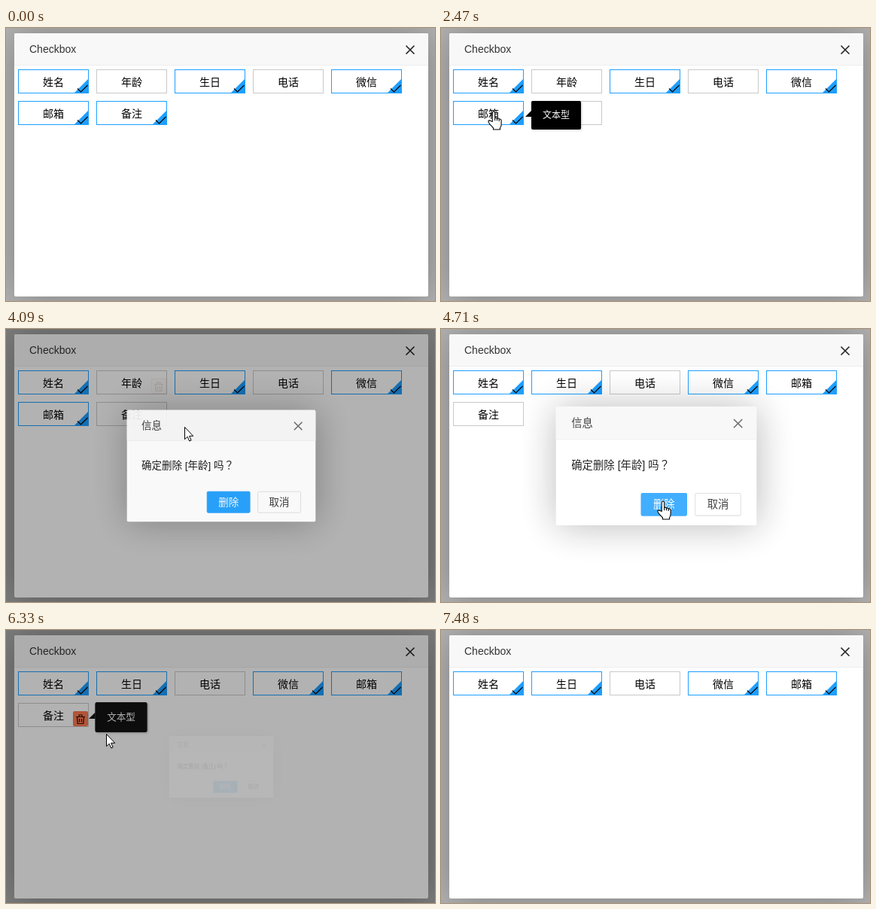
These frames come from a looping animation (570x363 px, 8340 ms). An HTML page:

```html
<!DOCTYPE html>
<html lang="zh-CN">
<head>
<meta charset="utf-8">
<title>Checkbox</title>
<style>
html, body { margin: 0; width: 100%; height: 100%; overflow: hidden; background: #b3b3b3; }
body { font: 14px "Liberation Sans", "Noto Sans CJK SC", "Noto Sans CJK", sans-serif; }
#stage { position: relative; width: 570px; height: 363px; overflow: hidden; background: #b3b3b3; }
#stage * { box-sizing: border-box; }
#stage div, #stage span, svg { position: absolute; white-space: nowrap; }
svg { overflow: visible; fill: none; }
.layer { background: #fff; border-radius: 2px; box-shadow: 1px 1px 50px rgba(0,0,0,.3); }
.title { left: 0; right: 0; top: 0; height: 43px; padding-left: 20px; line-height: 42px; color: #333;
  background: #f8f8f8; border-bottom: 1px solid #eee; border-radius: 2px 2px 0 0; }
.close { right: 18px; top: 16px; width: 12px; height: 12px; stroke: #222; stroke-width: 1.6; }
#main { left: 11px; top: 7px; width: 550px; height: 350px; }
.item { width: 94px; height: 32px; border: 1px solid #c9c9c9; line-height: 32px; text-align: center; color: #000; background: #fff; }
.on { inset: -1px; border: 1px solid #1e9fff; }
.on svg { right: 0; bottom: 0; width: 19px; height: 19px; }
.bin { left: 72px; top: 10px; width: 20px; height: 20px; }
.bin i { position: absolute; inset: 0; background: #ff5722; border-radius: 2px; }
.bin svg { left: 0; top: 0; width: 20px; height: 20px; stroke: #2a1008; stroke-width: 1.2; }
.tip { width: 66px; height: 38px; background: #000; color: #fff; border-radius: 2px; font-size: 12px;
  line-height: 38px; text-align: center; box-shadow: 1px 1px 3px rgba(0,0,0,.2); }
.tip::before { content: ""; position: absolute; left: -8px; top: 13px; border-left: 8px solid transparent; border-bottom: 8px solid #000; }
#shade { inset: 0; background: rgba(0,0,0,.3); }
#dialog { left: 156px; top: 105px; width: 260px; height: 154px; }
#dialog .close { stroke: #666; }
#question { left: 20px; top: 63px; line-height: 24px; color: #111; }
#question b { font: inherit; font-family: "Noto Sans CJK JP", sans-serif; }
.button { top: 112px; width: 60px; height: 30px; line-height: 29px; text-align: center; border: 1px solid #dedede; border-radius: 2px; color: #333; }
#ok { left: 110px; background: #1e9fff; border-color: #1e9fff; color: #fff; }
#cancel { left: 180px; }
#cursor { left: 0; top: 0; width: 20px; height: 26px; fill: #fff; stroke: #000; stroke-linejoin: round; }
</style>
</head>
<body>
<div id="stage">
  <div id="main" class="layer">
    <div class="title">Checkbox</div>
    <svg class="close"><path d="M.5 .5l11 11m0-11l-11 11"/></svg>
  </div>
  <div id="items"></div>
  <div id="tips"></div>
  <div id="shade"></div>
  <div id="dialog" class="layer">
    <div class="title">信息</div>
    <svg class="close"><path d="M.5 .5l11 11m0-11l-11 11"/></svg>
    <div id="question">确定删除 [<span id="name" style="position: static"></span>] 吗<b lang="ja">？</b></div>
    <div id="ok" class="button">删除</div>
    <div id="cancel" class="button">取消</div>
  </div>
  <svg id="cursor">
    <path id="arrow" d="M.5 .5v16.2l3.7-3.5 2.5 5.8 2.4-1-2.5-5.7h5.1z"/>
    <g id="hand" transform="translate(-7.7 -.6) scale(1.08)">
      <path d="M5.5 13V2.2a1.6 1.6 0 0 1 3.2 0V8.5q1.6-1 2.6.6 1.7-.7 2.5.8 2.2-.4 2.7 1.6v5q0 2.5-1.5 4.2v2H6.7v-1.8L2.3 16.2Q.2 13.2.6 12.4q1-1.6 2.8-.3z"/>
      <path d="M8.7 8.5V12M11.3 9v3M13.8 9.9v2.6"/>
    </g>
  </svg>
</div>
<script>
const LOOP = 8340, TICK = 77.24, APPEAR = 215, OPENING = 300, CLOSING = 200;
const $ = id => document.getElementById(id);

const items = [
  { name: '姓名', on: true }, { name: '年龄', type: '数值型' }, { name: '生日', type: '日期型', on: true },
  { name: '电话' }, { name: '微信', on: true }, { name: '邮箱', on: true }, { name: '备注', on: true, off: 1030 }
];
const dialogs = [{ item: items[1], open: 3880, close: 4682 }, { item: items[6], open: 6298, close: 6920 }];

// Pointer moves; everything it hovers follows from these.
const origin = { x: 317, y: 307 };
const moves = [
  { at: APPEAR, lasts: 600, x: 186, y: 115 },
  { at: 1610, lasts: 550, x: 69.5, y: 110.5 },
  { at: 2470, lasts: 500, x: 180, y: 74 },
  { at: 3250, lasts: 400, x: 204.5, y: 73 },
  { at: 3900, lasts: 500, x: 295, y: 229 },
  { at: 4700, lasts: 350, x: 190, y: 72 },
  { at: 5080, lasts: 250, x: 98, y: 105 },
  { at: 5750, lasts: 30, x: 94, y: 117.5 },
  { at: 6255, lasts: 335, x: 289, y: 220 },
  { at: 6700, lasts: 300, x: 299, y: 240 },
  { at: 7100, lasts: 370, x: 535, y: 376 }
];

const clamp = v => Math.max(0, Math.min(1, v));
const inside = (p, x, y, w, h) => p.x >= x && p.x < x + w && p.y >= y && p.y < y + h;
const show = (el, visible) => { el.style.display = visible ? '' : 'none'; };
const place = (el, x, y) => { el.style.left = x + 'px'; el.style.top = y + 'px'; };
const snap = t => Math.floor((t + 24) / TICK) * TICK - 12;

// cubic-bezier(.25, .1, .25, 1)
function ease(x) {
  x = clamp(x);
  if (x === 0 || x === 1) return x;
  const bezier = (u, a, b) => 3 * u * (1 - u) * (1 - u) * a + 3 * u * u * (1 - u) * b + u ** 3;
  let low = 0, high = 1;
  for (let i = 0; i < 20; i++) {
    const mid = (low + high) / 2;
    if (bezier(mid, .25, .25) < x) low = mid; else high = mid;
  }
  return bezier(low, .1, 1);
}

function pointerAt(t) {
  let p = origin;
  for (const { at, lasts, x, y } of moves) {
    const k = clamp((t - at) / lasts);
    p = { x: p.x + (x - p.x) * k, y: p.y + (y - p.y) * k };
  }
  return p;
}

const dialogAt = t => dialogs.find(d => t >= d.open && t < d.close + CLOSING);
const remaining = t => items.filter(item => !dialogs.some(d => d.item === item && t >= d.close));
const slot = i => ({ x: 16 + i % 5 * 104, y: 55 + Math.floor(i / 5) * 42 });
const onButton = t => !!dialogAt(t) && inside(pointerAt(t), 266, 217, 60, 30);

function hoverAt(t) {
  if (dialogAt(t)) return null;
  const p = pointerAt(t), list = remaining(t);
  const i = list.findIndex((_, n) => inside(p, slot(n).x, slot(n).y, 94, 32));
  if (i < 0) return null;
  const { x, y } = slot(i);
  return { item: list[i], x, y, bin: inside(p, x + 73, y + 11, 20, 20) };
}

function findHovers() {
  const spans = [];
  let current = null;
  for (let t = 0; t < LOOP; t += 2) {
    const hover = hoverAt(t);
    if (current && hover && hover.item === current.item && hover.bin === current.bin) continue;
    if (current) current.to = t;
    current = hover && { ...hover, from: t, to: LOOP };
    if (current) spans.push(current);
  }
  return spans;
}

// Grows in, then swells briefly before shrinking away.
function bounce(el, t, open, close) {
  const out = (t - close) / CLOSING;
  let scale, opacity;
  if (out < 0) {
    opacity = ease((t - open) / OPENING);
    scale = .5 + .5 * opacity;
  } else {
    opacity = 1 - ease(out);
    scale = out < .3 ? 1 + .05 * ease(out / .3) : 1.05 - .35 * ease((out - .3) / .7);
  }
  show(el, t >= open && out < 1);
  el.style.opacity = opacity;
  el.style.transform = scale === 1 ? 'none' : `scale(${scale})`;
}

function add(parent, className, html) {
  const el = document.createElement('div');
  el.className = className;
  el.innerHTML = html;
  return parent.appendChild(el);
}

for (const item of items) {
  item.el = add($('items'), 'item', `${item.name}
    <span class="on"><svg><path d="M1 19L19 1V19z" fill="#1e9fff"/><path d="M5 13.5l4.5 4.5 9-9" stroke="#000" stroke-width="1.1"/></svg></span>
    <span class="bin"><i></i><svg><rect x=".5" y=".5" width="19" height="19" rx="1.5" stroke="#b54a30" stroke-width="1"/>
    <path d="M4 7.5h12M8 7V5h4v2M5.5 8l.7 8.5h7.6l.7-8.5M8.5 10v4.5M11.5 10v4.5"/></svg></span>`);
}
const hovers = findHovers();
for (const hover of hovers) {
  hover.tip = add($('tips'), 'tip', hover.item.type || '文本型');
  place(hover.tip, hover.x + 104, hover.y);
}

function binStrength(item, t) {
  const levels = hovers.filter(h => h.bin && h.item === item)
    .map(h => ease((t - h.from) / 300) * (1 - ease((t - h.to) / 250)));
  return Math.max(0, ...levels);
}

function drawItems(t) {
  const list = remaining(t);
  for (const item of items) {
    const { el, on, off = LOOP } = item, i = list.indexOf(item);
    show(el, i >= 0);
    if (i < 0) continue;
    place(el, slot(i).x, slot(i).y);
    el.querySelector('.on').style.opacity = on ? 1 - clamp((t - off) / 110) : 0;
    const strength = binStrength(item, t);
    show(el.querySelector('.bin'), strength > 0);
    el.querySelector('i').style.opacity = strength;
    el.querySelector('.bin svg').style.opacity = clamp(5 * strength);
    el.querySelector('rect').style.opacity = .6 * (1 - strength);
  }
}

function drawDialog(t) {
  const { item, open, close } = dialogAt(t) || dialogs[0];
  $('name').textContent = item.name;
  show($('shade'), t >= open && t < close);
  bounce($('dialog'), t, open, close);
  $('ok').style.opacity = onButton(t) ? .9 : 1;
}

function drawPointer(t) {
  const { x, y } = pointerAt(t), hover = hoverAt(t);
  // A fully shown bin has the plain pointer.
  const hand = onButton(t) || !!hover && !(hover.bin && binStrength(hover.item, t) === 1);
  show($('cursor'), t >= APPEAR);
  $('cursor').style.transform = `translate(${Math.round(x)}px, ${Math.round(y)}px)`;
  show($('hand'), hand);
  show($('arrow'), !hand);
}

const began = performance.now();
function frame() {
  const t = snap((performance.now() - began) % LOOP);
  drawItems(t);
  for (const { tip, from, to } of hovers) bounce(tip, t, from, to);
  drawDialog(t);
  drawPointer(t);
  requestAnimationFrame(frame);
}
frame();
</script>
</body>
</html>
```
